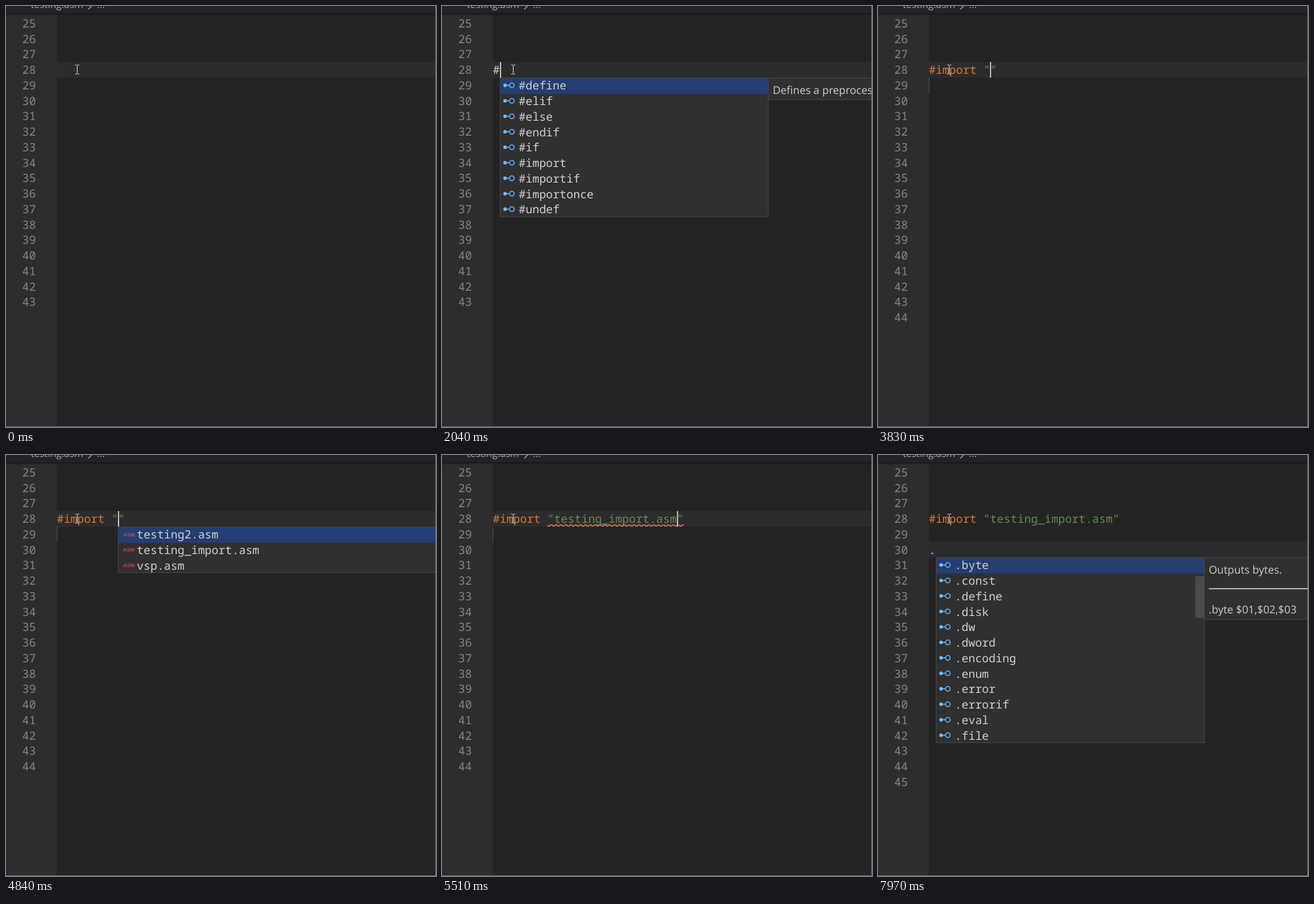
Animation, 661 px wide and 646 px high, one loop 8000 ms. Source, as an HTML page:

```html
<!DOCTYPE html>
<html lang="en">
<head>
<meta charset="utf-8">
<title>Code completion</title>
<style>
html, body { margin: 0; width: 100%; height: 100%; overflow: hidden; background: #242424; }
svg { display: block; width: 661px; height: 646px; }
text { white-space: pre; text-rendering: geometricPrecision; }
.code { font: 17.45px "Noto Sans Mono", monospace; fill: #d0d0d0; }
.num { fill: #858585; }
.word { fill: #d6783c; }
.str { fill: #6a8759; }
.ui { font: 16.5px "Open Sans", "Noto Sans", sans-serif; fill: #cccccc; }
.crumb { font-size: 15px; fill: #a9a9a9; }
.tag { font: bold 7.9px "Liberation Sans", sans-serif; fill: #cc3e44; }
.box { fill: #303031; stroke: #454545; }
</style>
</head>
<body>
<svg viewBox="0 0 661 646">
  <defs>
    <linearGradient id="shade" x2="0" y2="1">
      <stop stop-color="#161616"/>
      <stop offset="1" stop-color="#161616" stop-opacity="0"/>
    </linearGradient>
    <pattern id="wave" width="6" height="3" patternUnits="userSpaceOnUse" patternTransform="translate(162 106.2) scale(1.25)">
      <path fill="#f48771" d="M5.5 0l-3 3H1.1l3-3zM4 0l2 2V.6L5.4 0zM0 2l1 1h1.4L0 .6z"/>
    </pattern>
  </defs>
  <rect width="661" height="646" fill="#242424"/>
  <rect y="12" width="78" height="634" fill="#2d2d2d"/>
  <g id="view"></g>
  <rect y="11" width="661" height="4" fill="url(#shade)"/>
  <text class="ui crumb" x="38" y="3">testing.asm</text>
  <path d="M126.5-5l5 5-5 5" fill="none" stroke="#a9a9a9" stroke-width="1.3"/>
  <text class="ui crumb" x="140" y="3">...</text>
  <path d="M106.5 90.5h2l1 1 1-1h2M109.5 91v13M106.5 104.5h2l1-1 1 1h2" fill="none" stroke="#dddddd"/>
  <path d="M660.5 0v645.5H0" fill="none" stroke="#777777"/>
</svg>
<script>
const LOOP = 8000, ROW = 23.75;
const view = document.getElementById('view');
const rowTop = n => 86 + (n - 28) * ROW;
const snap = v => Math.round(v - .01);
const colX = c => Math.round(78.2 + 10.47 * c);

const rect = (x, y, w, h, fill) => `<rect x="${x}" y="${y}" width="${w}" height="${h}" fill="${fill}"/>`;
const box = (x, y, w, h) => `<rect class="box" x="${x + .5}" y="${y + .5}" width="${w - 1}" height="${h - 1}"/>`;
const text = (x, y, cls, s) => `<text x="${x}" y="${y}" class="${cls}">${s}</text>`;
const span = (cls, s) => `<tspan class="${cls}">${s}</tspan>`;

const hashes = '#define #elif #else #endif #if #import #importif #importonce #undef'.split(' ');
const dots = '.byte .const .define .disk .dw .dword .encoding .enum .error .errorif .eval .file'.split(' ');
const files = ['testing2.asm', 'testing_import.asm', 'vsp.asm'];
const importLine = name => span('word', '#import') + ' ' + span('str', `"${name}"`);

const hashList = {items: hashes, doc: ['Defines a preprocessor symbol.']};
const ifList = {items: hashes.slice(4, 8), match: 'i', doc: ['Discards the source if', 'the condition is false.']};
const importList = {items: hashes.slice(5, 8), match: 'im', doc: ['Imports another source file.']};
const fileList = {items: files, files: true, width: 600};
const dotList = {items: dots, doc: ['Outputs bytes.'], sample: '.byte $01,$02,$03', scroll: true};

// Each step changes only the listed parts of the editor state.
const steps = [
  [0, {line: 28, col: 0, last: 43, code: '', typed: '', caret: false, list: null, pick: 0, guide: false, wave: 0}],
  [870, {caret: true}],
  [1340, {caret: false}],
  [1860, {caret: true}],
  [2040, {code: '#', col: 1, list: hashList}],
  [2470, {caret: false}],
  [2810, {code: '#i', col: 2, caret: true, list: ifList}],
  [2960, {code: '#im', col: 3, list: importList}],
  [3420, {caret: false}],
  [3830, {code: importLine(''), col: 9, caret: true, list: null, last: 44, guide: true}],
  [3920, {list: fileList}],
  [4280, {caret: false}],
  [4840, {caret: true}],
  [4930, {pick: 1}],
  [5110, {wave: 2}],
  [5270, {caret: false}],
  [5510, {code: importLine(files[1]), col: 27, caret: true, list: null, pick: 0, wave: 20}],
  [5940, {caret: false, guide: false}],
  [6470, {line: 29, col: 0, caret: true}],
  [6560, {line: 30, last: 45}],
  [6940, {wave: 0}],
  [7020, {caret: false}],
  [7550, {typed: '.', col: 1, caret: true}],
  [7630, {list: dotList}],
  [7970, {caret: false}]
];

function drawList(list, pick, x, y) {
  const w = list.width || 413, h = Math.round(list.items.length * ROW);
  let out = box(x, y, w, h);
  list.items.forEach((item, i) => {
    const t = y + i * ROW, mid = t + 11.7;
    if (i === pick) out += rect(x + 1, t + 1, w - 2, ROW, '#243e72');
    out += list.files
      ? text(x + 8, mid + 3, 'tag', 'ASM')
      : `<g fill="#75beff" stroke="#75beff" stroke-width="1.4"><circle cx="${x + 8}" cy="${mid}" r="2"/>
         <path d="M${x + 8} ${mid}h6.5"/><circle cx="${x + 18.3}" cy="${mid}" r="3.6" fill="none"/></g>`;
    const m = list.match;
    out += text(x + 29, t + 18.4, 'code', m ? item.replace(m, span('word', m)) : item);
  });
  if (list.scroll) out += rect(x + w - 14, y + 29, 13, 64, '#4b4b4c');
  if (list.doc) {
    const dx = x + w - 1, tx = dx + 7.5;
    out += box(dx, y, 300, list.sample ? 96 : 11 + 23.3 * list.doc.length);
    list.doc.forEach((s, i) => out += text(tx, y + 24.8 + i * 23.3, 'ui', s));
    if (list.sample) out += rect(tx, y + 47.5, 300, 1.5, '#dddddd') + text(tx, y + 86, 'ui', list.sample);
  }
  return out;
}

function draw(s) {
  const y = snap(rowTop(s.line));
  let out = rect(78, y, 582, 24, '#2c2c2c');
  for (let n = 25; n <= s.last; n++) out += text(25, rowTop(n) + 18.2, 'code num', n);
  if (s.guide) out += rect(78, 110, 1, 24, '#4a4a4a');
  out += text(78.2, rowTop(28) + 18.2, 'code', s.code);
  out += text(78.2, rowTop(30) + 18.2, 'code', s.typed);
  if (s.wave) out += rect(162, 106.2, 10.47 * s.wave, 3.75, 'url(#wave)');
  if (s.list) out += drawList(s.list, s.pick, colX(s.col), snap(rowTop(s.line + 1)));
  if (s.caret) out += rect(colX(s.col), y, 2, 24, '#b8b8b8');
  view.innerHTML = out;
}

let shown = -1;
function frame() {
  const t = performance.now() % LOOP;
  const past = steps.filter(step => step[0] <= t);
  if (past.length !== shown) {
    shown = past.length;
    draw(Object.assign({}, ...past.map(step => step[1])));
  }
  requestAnimationFrame(frame);
}
frame();
</script>
</body>
</html>
```
